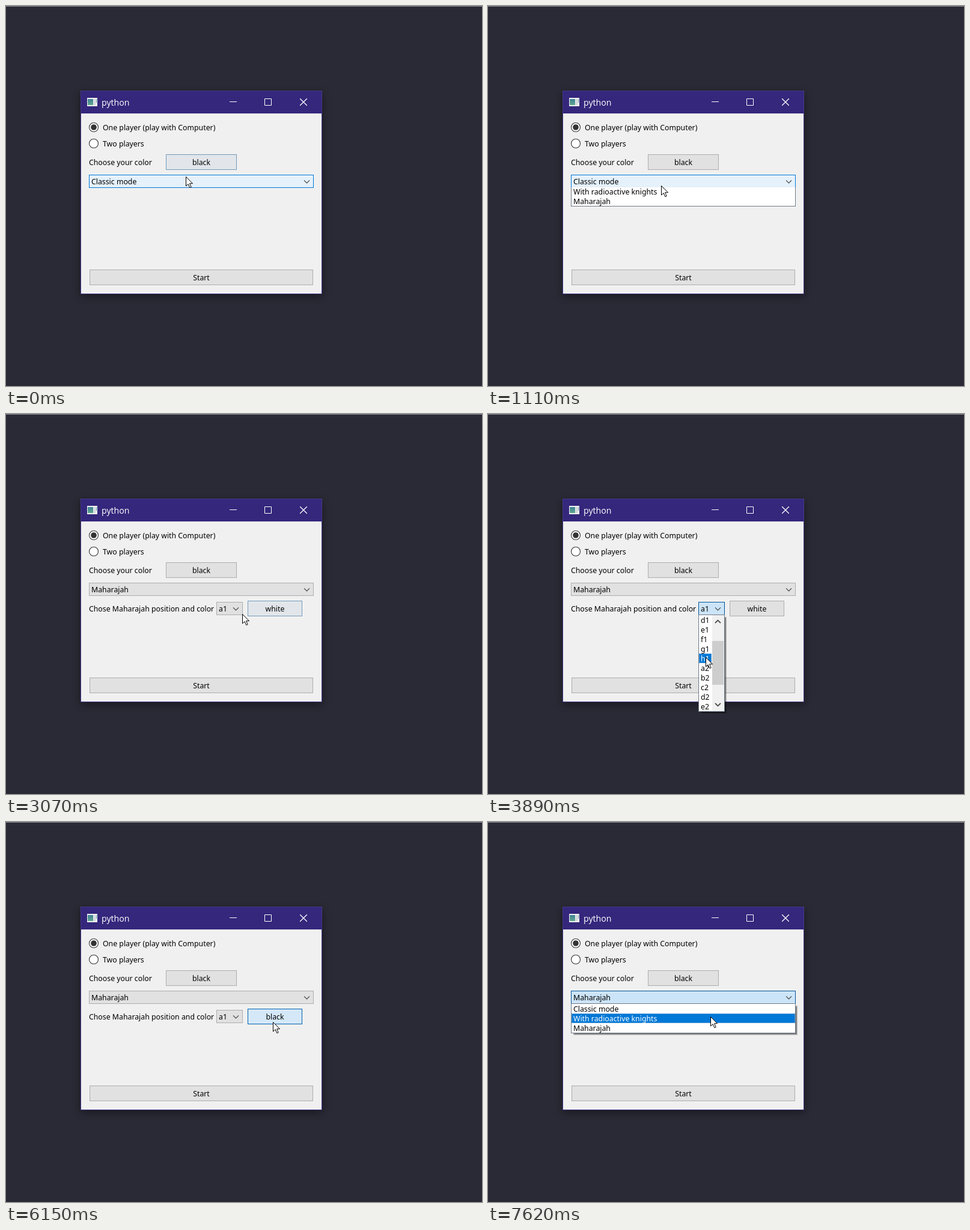
Write an HTML page that moves like this. It is 792 px wide and 633 px high and loops after 8 s.

```html
<!DOCTYPE html>
<html lang="en">
<head>
<meta charset="utf-8">
<title>Game settings dialog</title>
<style>
  html, body { margin: 0; width: 100%; height: 100%; overflow: hidden; background: #292a35; }
  svg { display: block; }
  text { font: 12.3px "Noto Sans", "Open Sans", sans-serif; white-space: pre; }
  .title { font: 14.2px "Open Sans", "Noto Sans", sans-serif; }
</style>
</head>
<body>
<svg width="792" height="633" viewBox="0 0 792 633">
  <defs>
    <filter id="soft" x="-20%" y="-20%" width="140%" height="140%"><feGaussianBlur stdDeviation="7"/></filter>
    <linearGradient id="teal" x2="0" y2="1"><stop stop-color="#3f7f9a"/><stop offset="1" stop-color="#5fa88c"/></linearGradient>
  </defs>
  <rect width="792" height="633" fill="#292a35"/>
  <rect width="792" height="1" fill="#8c8c92"/>
  <rect x="124" y="145" width="402" height="339" opacity=".42" filter="url(#soft)"/>
  <rect x="124.5" y="141.5" width="401" height="338" fill="#34277c" stroke="#463a8a"/>
  <rect x="125" y="179" width="400" height="300" fill="#f0f0f0"/>
  <rect x="135" y="153" width="17" height="14" fill="#f1f1f1"/>
  <rect x="136" y="155" width="9" height="10" fill="url(#teal)"/>
  <rect x="146" y="155" width="3" height="10" fill="#d3d8dc"/>
  <rect x="150" y="155" width="1" height="6" fill="#5b9a9a"/>
  <text class="title" x="159" y="166" fill="#fff">python</text>
  <path d="M372 159.5h12M430.5 154.5h11v11h-11z" fill="none" stroke="#fff"/>
  <path d="M489.2 154.2l11.6 11.6m0-11.6l-11.6 11.6" stroke="#fff" stroke-width="1.3"/>
  <g stroke="#333" stroke-width="1.1" fill="#fff"><circle cx="146" cy="202" r="7.5"/><circle cx="146" cy="229" r="7.5"/></g>
  <circle cx="146" cy="202" r="4.8" fill="#333"/>
  <text x="161" y="207">One player (play with Computer)</text>
  <text x="161" y="234">Two players</text>
  <text x="138" y="265">Choose your color</text>
  <g id="scene"></g>
</svg>
<script>
const LOOP = 8000, STEP = 123;
const scene = document.getElementById('scene');

const modes = ['Classic mode', 'With radioactive knights', 'Maharajah'];
const squares = [1, 2].flatMap(n => [...'abcdefgh'].map(c => c + n));

// Moments of the session, counted in steps.
const CHOSEN = 18, SCROLL = 30, PRESS = 48, RELEASE = 50;
const modeOpen = [[9, CHOSEN], [59, 66]];
const squareOpen = [[27, 43]];

// Stops of the mouse pointer: step, x, y.
const stops = [
  [-2, 310, 262], [0, 299, 284], [7, 288, 299], [10, 288, 299], [15, 250, 336],
  [CHOSEN, 251, 338], [24, 408, 334], [25, 393, 333], [27, 387, 326],
  [SCROLL, 362, 404], [33, 362, 406], [35, 389, 384], [39, 443, 313],
  [43, 443, 318], [45, 444, 333], [RELEASE, 444, 333], [57, 371, 293], [59, 371, 298], [61, 370, 324]
];

function pointer(n) {
  const i = stops.findIndex(s => s[0] > n);
  if (i < 1) return stops.at(i).slice(1);
  const [a, ax, ay] = stops[i - 1], [b, bx, by] = stops[i];
  const k = (n - a) / (b - a);
  return [ax + (bx - ax) * k, ay + (by - ay) * k].map(Math.round);
}

// A list is partly out on its first step and fully open afterwards.
function openness(spans, n) {
  const span = spans.find(([a, b]) => n >= a && n < b);
  return span ? (n === span[0] ? .64 : 1) : 0;
}

const widgets = {
  color: { x: 266, y: 247, w: 118, h: 26 },
  mode: { x: 138, y: 281, w: 374, h: 22, open: modeOpen },
  square: { x: 350, y: 313, w: 44, h: 22, open: squareOpen },
  side: { x: 402, y: 311, w: 91, h: 26 },
  start: { x: 139, y: 439, w: 372, h: 26 }
};

// 0 idle, 1 hovered, 2 pressed
function state(widget, n) {
  const { x, y, w, h, open } = widget;
  if (open && openness(open, n) === 1) return 2;
  if (openness([...modeOpen, ...squareOpen], n) === 1) return 0;
  if (widget === widgets.side && n >= PRESS && n < RELEASE) return 2;
  const [px, py] = pointer(n);
  return +(px >= x + 2 && px < x + w - 2 && py >= y + 2 && py < y + h - 2);
}

// Highlights come at once and fade over three steps.
function level(widget, n) {
  const recent = [0, 1, 2].map(k => state(widget, n - k));
  return Math.max(recent[0], recent.reduce((a, b) => a + b) / 3);
}

const fills = [[225, 225, 225], [229, 241, 251], [204, 228, 247]];
const edges = [[173, 173, 173], [0, 120, 215], [0, 84, 153]];
function shade(list, v) {
  const i = Math.min(1, Math.floor(v));
  return `rgb(${list[i].map((c, j) => Math.round(c + (list[i + 1][j] - c) * (v - i)))})`;
}

const rect = (x, y, w, h, fill, extra = '') =>
  `<rect x="${x}" y="${y}" width="${w}" height="${h}" fill="${fill}" ${extra}/>`;
const box = (x, y, w, h, fill, edge) =>
  rect(x + .5, y + .5, w - 1, h - 1, fill, `stroke="${edge}"`);
const label = (x, y, s, extra = '') => `<text x="${x}" y="${y}" ${extra}>${s}</text>`;
const chevron = (x, y, dir = 1, width = 1.2) =>
  `<path d="M${x - 4.5} ${y - 2.2 * dir}l4.5 ${4.5 * dir}l4.5 ${-4.5 * dir}" fill="none" stroke="#444" stroke-width="${width}"/>`;

function panel(widget, n) {
  const v = level(widget, n);
  return box(widget.x, widget.y, widget.w, widget.h, shade(fills, v), shade(edges, v));
}
const button = (b, s, n) =>
  panel(b, n) + label(b.x + b.w / 2, b.y + 18, s, 'text-anchor="middle"');
const combo = (c, s, n) =>
  panel(c, n) + label(c.x + 4, c.y + 16, s) + chevron(c.x + c.w - 11.5, c.y + 11.5);

const shadow = (x, y, w, h) => [3, 2, 1].map(i =>
  rect(x + 7 - i, y + 7 - i, w - 7 + 2 * i, h - 7 + 2 * i, '#000', 'opacity=".22"')).join('');

function listRows(items, picked, w) {
  return items.map((s, i) => {
    const y = 1 + 16 * i, on = s === picked;
    const mark = on ? rect(1, y, w, 16, '#0078d7') +
      rect(1.5, y + .5, w - 1, 15, 'none', 'stroke="#9fbbd0" stroke-dasharray="1 1"') : '';
    return mark + label(4, y + 13, s, on ? 'fill="#fff"' : '');
  }).join('');
}

// A list that slides down from under its combo box.
function popup({ x, w }, y, rows, open, content) {
  const h = 16 * rows + 2;
  return (open === 1 ? shadow(x, y, w, h) : '') +
    `<svg x="${x}" y="${y}" width="${w}" height="${h}"><g transform="translate(0 ${Math.round(h * (open - 1))})">` +
    box(0, 0, w, h, '#fff', '#6f7a88') + content + '</g></svg>';
}

function modePopup(n, current) {
  const open = openness(modeOpen, n);
  if (!open) return '';
  const picked = modes[Math.floor((pointer(n)[1] - 303) / 16)] || current;
  return popup(widgets.mode, 302, 3, open, listRows(modes, picked, 372));
}

function squarePopup(n) {
  const open = openness(squareOpen, n);
  if (!open) return '';
  const top = Math.min(6, Math.max(0, 3 * (n - SCROLL)));
  const y = pointer(Math.min(n, SCROLL))[1];
  const row = Math.max(0, Math.floor((y - 335) / 16));
  const bar = rect(23, 1, 20, 160, '#f0f0f0') +
    rect(23, 21 + 46 * top / 6, 19, 73, '#cdcdcd') +
    chevron(32.5, 12, -1, 1.8) + chevron(32.5, 150, 1, 1.8);
  return popup(widgets.square, 334, 10, open,
    listRows(squares.slice(top, top + 10), squares[top + row], 21) + bar);
}

function draw(n) {
  const [x, y] = pointer(n);
  const chosen = n >= CHOSEN;
  const current = chosen ? modes[2] : modes[0];
  const extras = label(138, 329, 'Chose Maharajah position and color') +
    combo(widgets.square, 'a1', n) +
    button(widgets.side, n < RELEASE ? 'white' : 'black', n);
  scene.innerHTML = button(widgets.color, 'black', n) +
    combo(widgets.mode, current, n) + button(widgets.start, 'Start', n) +
    (chosen ? extras : '') + modePopup(n, current) + squarePopup(n) +
    `<path transform="translate(${x + .5} ${y + .5})" d="M0 0V15.5L3.6 12.1L6.3 18.2L8.7 17.2L6.1 11.2H11Z" fill="#fff" stroke="#000"/>`;
}

let shown = -1;
function play(now) {
  const n = Math.floor((now % LOOP + 5) / STEP);
  if (n !== shown) draw(shown = n);
  requestAnimationFrame(play);
}
draw(shown = 0);
requestAnimationFrame(play);
</script>
</body>
</html>
```
